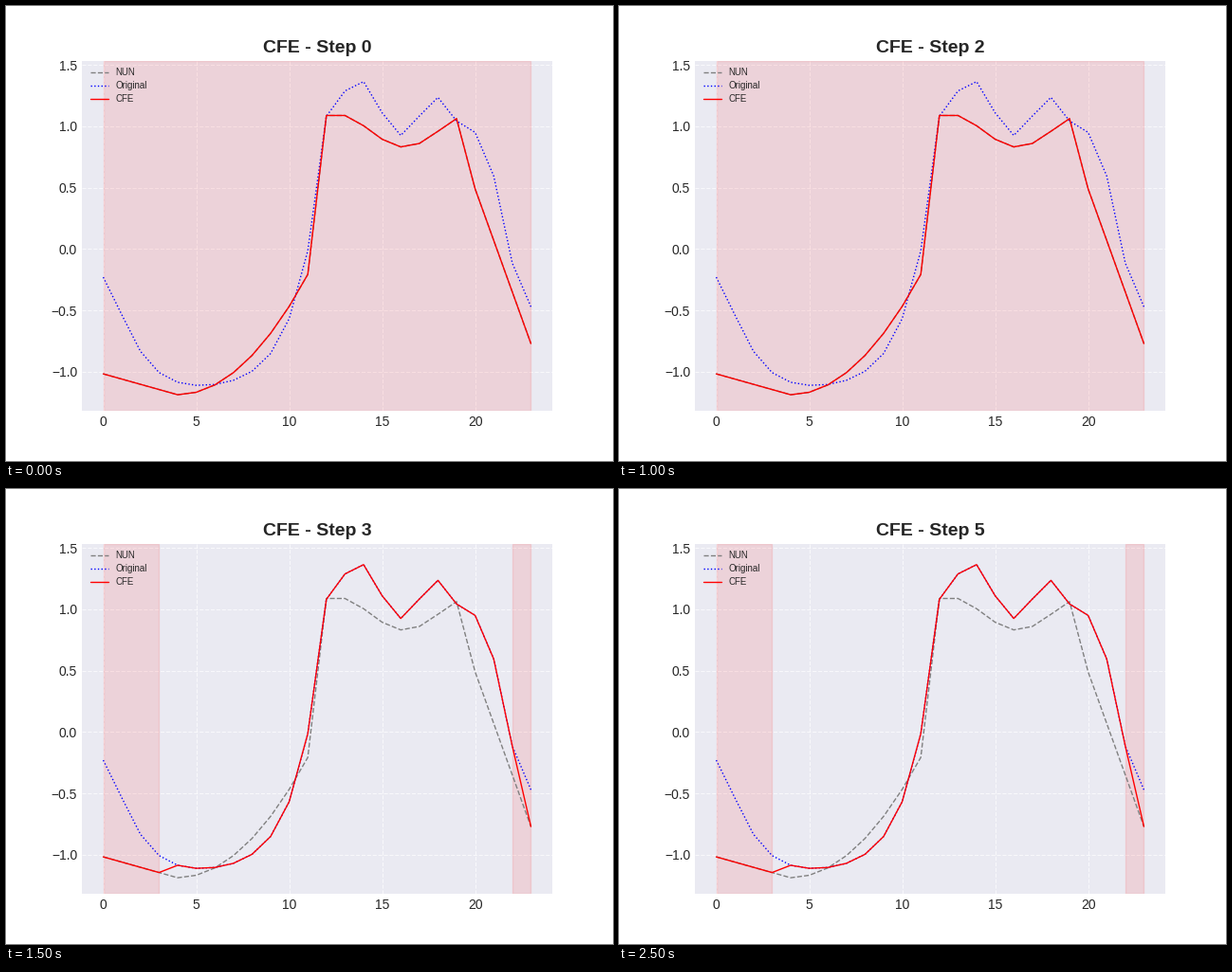
Write a matplotlib script that moves like this. It is 640 px wide and 480 px high and loops after 3 s.

```python
import matplotlib.pyplot as plt
import numpy as np
from matplotlib.animation import FuncAnimation

STEPS = 6
STEP_MS = 500

plt.style.use("seaborn-v0_8-darkgrid")
plt.rcParams["font.family"] = "Liberation Sans"

time = np.arange(24)
last = time[-1]


def wave(t, peak, period):
    return np.cos(2 * np.pi * (t - peak) / period)


def join(night, day, evening):
    """Switch from night to day at hour 12 and to evening at hour 20."""
    return np.select([time < 12, time < 20], [night, day], evening)


# Decay then exponential rise, two daytime peaks, eased fall.
base = join(
    -1.15 + 0.92 * np.exp(-(time / 1.9) ** 1.4) + 2.216 * 1.95 ** (time - 12.0),
    1.25 - 0.034 * (time - 12) + 0.19 * wave(time, 13.8, 4.25),
    0.24 + 0.71 * wave(time, 20, 6))

# Slow drop then quadratic rise, shallow daytime dip, straight fall.
neighbour = join(
    -1.187 + np.where(time < 4, 0.0425 * (4 - time), 0.02 * (time - 4) ** 2),
    0.965 + 0.135 * wave(time, 12.5, 7.4),
    0.49 - 0.42 * (time - 20))

fig, ax = plt.subplots(figsize=(6.4, 4.8), dpi=100)


def counterfactual(step):
    """Return the mixed series and the spans where it was altered."""
    if step % 2 == 0:
        return neighbour, [(0, last)]
    swapped = (time <= 3) | (time == last)
    return np.where(swapped, neighbour, base), [(0, 3), (last - 1, last)]


def draw(step):
    ax.clear()
    series, spans = counterfactual(step)
    ax.plot(time, neighbour, color="gray", ls="--", lw=1, label="NUN")
    ax.plot(time, base, color="blue", ls=":", lw=1, label="Original")
    ax.plot(time, series, color="red", lw=1, label="CFE")
    for start, end in spans:
        ax.axvspan(start, end, color="red", alpha=0.1)
    ax.set_xlim(-0.05 * last, 1.05 * last)
    ax.set_ylim(-1.319, 1.535)
    ax.grid(True, linestyle="--", alpha=0.7)
    ax.set_title(f"CFE - Step {step}", fontsize=14, fontweight="bold")
    ax.legend(loc="upper left", bbox_to_anchor=(0, 1.003), fontsize=7,
              labelspacing=0.4, handletextpad=0.7)
    return ax.get_children()


anim = FuncAnimation(fig, draw, frames=STEPS, interval=STEP_MS,
                     init_func=lambda: draw(0), repeat=True, repeat_delay=0)
plt.show()
```
